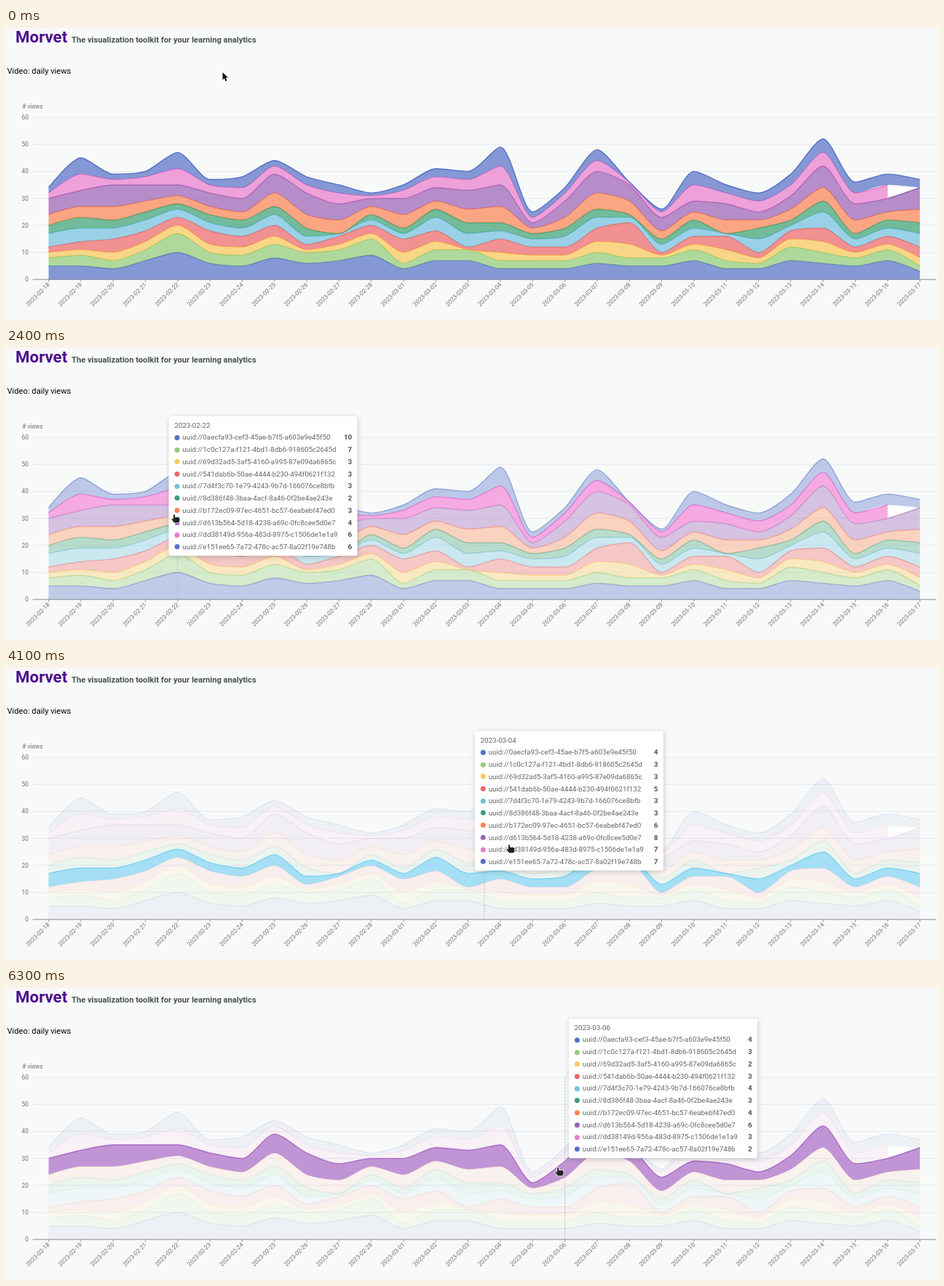
These frames come from a looping animation (1280 by 402 pixels, 7.8 s). An HTML page:

```html
<!DOCTYPE html>
<html lang="en">
<head>
<meta charset="utf-8">
<title>Daily views</title>
<style>
  html, body { margin: 0; width: 100%; height: 100%; overflow: hidden; background: #f8faf9; }
  body { position: relative; font-family: Roboto, "Liberation Sans", sans-serif; }
  svg { position: absolute; left: 0; top: 0; display: block; }
  svg text { font-family: Roboto, "Liberation Sans", sans-serif; }
  .axis { font-size: 8.37px; fill: #6e7079; }
  #tip {
    position: absolute; left: 0; top: 0; box-sizing: border-box; padding: 7.7px;
    background: #fff; border-radius: 2.8px; box-shadow: .7px 1.4px 7px rgba(0, 0, 0, .2);
    font-size: 9.77px; line-height: 9.77px; color: #666; white-space: nowrap;
  }
  .row { display: flex; align-items: center; margin-top: 6.97px; height: 9.77px; }
  .row i { width: 7px; height: 7px; border-radius: 50%; margin-right: 4.2px; }
  .row b { margin-left: auto; padding-left: 14px; font-weight: 900; }
</style>
</head>
<body>
<svg id="chart" width="1280" height="402" viewBox="0 0 1280 402">
  <text x="13" y="20" font-size="22.3" font-weight="700" fill="#4c1191">Morvet</text>
  <text x="90" y="19.5" font-size="11.16" font-weight="700" fill="#495057">The visualization toolkit for your learning analytics</text>
  <text x="1.5" y="63" font-size="11.16" fill="#000">Video: daily views</text>
</svg>
<div id="tip"></div>
<svg width="1280" height="402" viewBox="0 0 1280 402">
  <g id="cursor" stroke="#fff" stroke-width="1.4" paint-order="stroke" stroke-linejoin="round">
    <path id="arrow" fill="#111" d="M0 0v10.5l2.4-2.2 1.7 4 1.9-.8-1.7-3.9h3.2z"/>
    <path id="hand" fill="#222" d="M-2 1q1-1.6 2 0v3h4.5q2 .3 2 2v3l-1.5 2.5h-6l-3.5-4.5q0-1.6 1.4-1l1.1 1z"/>
  </g>
</svg>
<script>
const LOOP = 7800, STEP = 100, DAYS = 28;
const LEFT = 36.4, RIGHT = 1277.4, TOP = 123, BASE = 346.2;
const DAY_W = 44.32, UNIT = 3.72, SMOOTH = .25;
const px = day => 58.5 + DAY_W * day;
const py = views => BASE - UNIT * views;
const mix = (a, b, k) => a + (b - a) * k;
const $ = id => document.getElementById(id);
const chart = $('chart'), tip = $('tip');

function add(tag, attrs, text) {
  const el = document.createElementNS('http://www.w3.org/2000/svg', tag);
  for (const k in attrs) el.setAttribute(k, attrs[k]);
  if (text) el.textContent = text;
  return chart.appendChild(el);
}

const dates = Array.from({ length: DAYS }, (_, i) =>
  new Date(Date.UTC(2023, 1, 18 + i)).toISOString().slice(0, 10));

// Axes
for (let v = 0; v <= 60; v += 10) {
  const y = py(v);
  if (v) add('path', { d: `M${LEFT} ${y}H${RIGHT}`, stroke: '#e0e6f1', 'stroke-width': .8 });
  add('text', { class: 'axis', x: 31, y, dy: '.35em', 'text-anchor': 'end' }, String(v));
}
add('text', { class: 'axis', x: 36.5, y: 107.6, dy: '.35em', 'text-anchor': 'middle' }, '# views');
dates.forEach((date, i) => {
  add('path', { d: `M${px(i)} ${BASE}v3.5`, stroke: '#6e7079', 'stroke-width': .7 });
  add('text', {
    class: 'axis', dy: '.35em', 'text-anchor': 'end',
    transform: `translate(${px(i)} 351.8) rotate(-45)`
  }, date);
});
add('path', { d: `M${px(26)} ${py(34)}H${px(27)}L${px(26)} ${py(30)}z`, fill: '#fff' });

// Smooth curve whose control points never leave the span of their segment
function curve(pts) {
  const clamp = (v, a, b) => Math.max(Math.min(a, b), Math.min(Math.max(a, b), v));
  let out = pts[0].join(' '), c0 = pts[0];
  for (let i = 1; i < pts.length; i++) {
    const p = pts[i], prev = pts[i - 1], next = pts[i + 1];
    let c1 = p, c2 = p;
    if (next) {
      const a = Math.hypot(p[0] - prev[0], p[1] - prev[1]);
      const b = Math.hypot(next[0] - p[0], next[1] - p[1]);
      const ahead = p.map((v, k) => clamp(v + (next[k] - prev[k]) * SMOOTH * b / (a + b), v, next[k]));
      c1 = p.map((v, k) => clamp(v - (ahead[k] - v) * a / b, prev[k], v));
      c2 = p.map((v, k) => v + (v - c1[k]) * b / a);
    }
    out += `C${[...c0, ...c1, ...p].map(v => v.toFixed(2)).join(' ')}`;
    c0 = c2;
  }
  return out;
}

const series = [];
let floor = Array(DAYS).fill(0);

function addSeries(id, color, views) {
  const top = floor.map((v, i) => v + (views[i] || 0));
  const points = vals => views.map((_, i) => [px(i), py(vals[i])]);
  const line = 'M' + curve(points(top));
  const area = add('path', { d: `${line}L${curve(points(floor).reverse())}z` });
  const stroke = add('path', { d: line, fill: 'none', 'stroke-width': 1.4, 'stroke-linejoin': 'bevel' });
  const rgb = [1, 3, 5].map(k => parseInt(color.slice(k, k + 2), 16));
  series.push({ id, color, rgb, views, top, area, stroke });
  floor = top;
}

// Two neighbouring bands share one daily total; the lower one may end early
function addPair(lower, upper, share, totals, days = DAYS) {
  const part = totals.slice(0, days).map(v => Math.round(v * share));
  addSeries(...lower, part);
  addSeries(...upper, totals.map((v, i) => v - (part[i] || 0)));
}

addPair(['0aecfa93-cef3-45ae-b7f5-a603e9e45f50', '#5470c6'],
  ['1c0c127a-f121-4bd1-8db6-918605c2645d', '#91cc75'], .61,
  [8, 9, 7, 11, 17, 10, 9, 13, 10, 11, 15, 6, 11, 11, 7, 7, 7, 10, 8, 8, 11, 7, 6, 12, 10, 8, 11, 5]);
addPair(['69d32ad5-3af5-4160-a995-87e09da6865c', '#fac858'],
  ['541dab6b-50ae-4444-b230-494f0621f132', '#ee6666'], .42,
  [4, 5, 8, 7, 6, 8, 7, 7, 3, 5, 5, 9, 7, 1, 8, 5, 5, 9, 13, 2, 5, 9, 4, 6, 9, 4, 5, 7]);
addPair(['7d4f3c70-1e79-4243-9b7d-166076ce8bfb', '#73c0de'],
  ['8d386f48-3baa-4acf-8a46-0f2be4ae243e', '#3ba272'], .58,
  [8, 9, 7, 7, 5, 6, 6, 7, 6, 1, 4, 4, 8, 9, 6, 5, 7, 7, 3, 5, 6, 1, 9, 4, 10, 5, 6, 9]);
addPair(['b172ec09-97ec-4651-bc57-6eabebf47ed0', '#fc8452'],
  ['d613b564-5d18-4238-a69c-0fc8cee5d0e7', '#9a60b4'], .42,
  [10, 10, 13, 10, 7, 8, 8, 12, 13, 11, 6, 11, 8, 12, 14, 4, 10, 14, 11, 8, 7, 11, 6, 9, 13, 11, 8, 13]);
addPair(['dd38149d-956a-483d-8975-c1506de1e1a9', '#ea7ccc'],
  ['e151ee65-7a72-478c-ac57-8a02f19e748b', '#5470c6'], .52,
  [4, 12, 4, 5, 12, 5, 8, 5, 6, 7, 2, 5, 7, 7, 14, 4, 5, 8, 1, 3, 11, 7, 7, 8, 10, 8, 9, 3], DAYS - 1);

add('path', { d: `M${LEFT} ${BASE}H${RIGHT}`, stroke: '#6e7079', 'stroke-width': .8 });
const rule = add('path', { d: `M0 ${TOP}V${BASE}`, stroke: '#b0b4be', 'stroke-width': .8, 'stroke-dasharray': '2.8 1.6' });

tip.innerHTML = '<div></div>' + series.map(s =>
  `<div class="row"><i style="background:${s.color}"></i><span>uuid://${s.id}</span><b></b></div>`).join('');
const heading = tip.firstChild, counts = tip.querySelectorAll('b');

// Pointer path: time, x, y
const path = [
  [100, 297.5, 61], [700, 32, 117], [900, 76, 110], [1100, 76, 54], [1260, 76, 54],
  [1450, 86, 195], [1500, 98, 227], [1850, 150, 221], [2050, 200, 186], [2250, 222, 170],
  [2350, 228, 208], [2400, 232, 229], [3050, 400, 282], [3150, 428, 296], [3200, 444, 292],
  [3600, 626, 293], [4000, 626, 293], [4050, 658, 289], [4100, 692, 243], [4400, 722, 219],
  [5000, 744, 219], [5150, 753, 241.5], [5300, 759, 247]
];

function pointer(t) {
  const i = path.findIndex(key => key[0] > t);
  if (i < 1) return path.at(i).slice(1);
  const a = path[i - 1], b = path[i], k = (t - a[0]) / (b[0] - a[0]);
  return [mix(a[1], b[1], k), mix(a[2], b[2], k)];
}

// Index of the band under a point, or -1
function bandAt(x, y) {
  const pos = (x - px(0)) / DAY_W, i = Math.floor(pos);
  if (i < 0 || i >= DAYS - 1) return -1;
  return series.findIndex(s => py(mix(s.top[i], s.top[i + 1], pos - i)) < y);
}

// The tooltip sits below right of the pointer, or above it when there is no room
const TIP_H = 192.6, GAP_X = 14, GAP_Y = 12;
const tipGoal = (x, y) =>
  [x + GAP_X, y + GAP_Y + TIP_H > 402 ? y - GAP_Y - TIP_H : y + GAP_Y];

// Hover reacts half a step late; fades and the tooltip chase their goals
const NORMAL = .7, BLURRED = .07, FADE = .51, CHASE = .38;

function simulate() {
  const states = [];
  let alpha = series.map(() => NORMAL), lift = series.map(() => 0);
  let day = -1, lastDay = -1, box = null;
  for (let t = 0; t < LOOP; t += STEP) {
    const [x, y] = pointer(t - STEP / 2);
    const inside = y > TOP && y < BASE;
    const band = inside ? bandAt(x, y) : -1;
    alpha = alpha.map((v, i) => mix(v, band < 0 || band === i ? NORMAL : BLURRED, FADE));
    lift = lift.map((v, i) => mix(v, band === i ? 1 : 0, FADE));
    if (inside) {
      const goal = tipGoal(x, y);
      box = box ? box.map((v, k) => mix(v, goal[k], CHASE)) : goal;
      lastDay = day;
      day = Math.floor((x - LEFT) / DAY_W);
      if (lastDay < 0) lastDay = day;
    }
    states.push({ alpha, lift, band, box, day, ruleX: px((day + lastDay) / 2), at: pointer(t) });
  }
  return states;
}

const states = simulate();
const show = (el, on) => { el.style.visibility = on ? 'visible' : 'hidden'; };

function draw({ alpha, lift, band, box, day, ruleX, at }) {
  series.forEach((s, i) => {
    const color = `rgb(${s.rgb.map(c => Math.min(255, Math.round(c * (1 + .1 * lift[i])))).join(',')})`;
    s.area.setAttribute('fill', color);
    s.area.setAttribute('fill-opacity', alpha[i]);
    s.stroke.setAttribute('stroke', color);
    s.stroke.setAttribute('stroke-opacity', alpha[i] / NORMAL);
  });

  show(tip, box);
  show(rule, box);
  if (box) {
    heading.textContent = dates[day];
    counts.forEach((el, i) => { el.textContent = series[i].views[day] ?? '-'; });
    tip.style.transform = `translate(${box[0]}px, ${box[1]}px)`;
    rule.setAttribute('transform', `translate(${ruleX} 0)`);
  }

  show($('hand'), band >= 0);
  show($('arrow'), band < 0);
  $('cursor').setAttribute('transform', `translate(${at.join(' ')})`);
}

let shown = -1;
function tick() {
  const n = Math.floor(performance.now() % LOOP / STEP);
  if (n !== shown) draw(states[shown = n]);
  requestAnimationFrame(tick);
}
tick();
</script>
</body>
</html>
```
